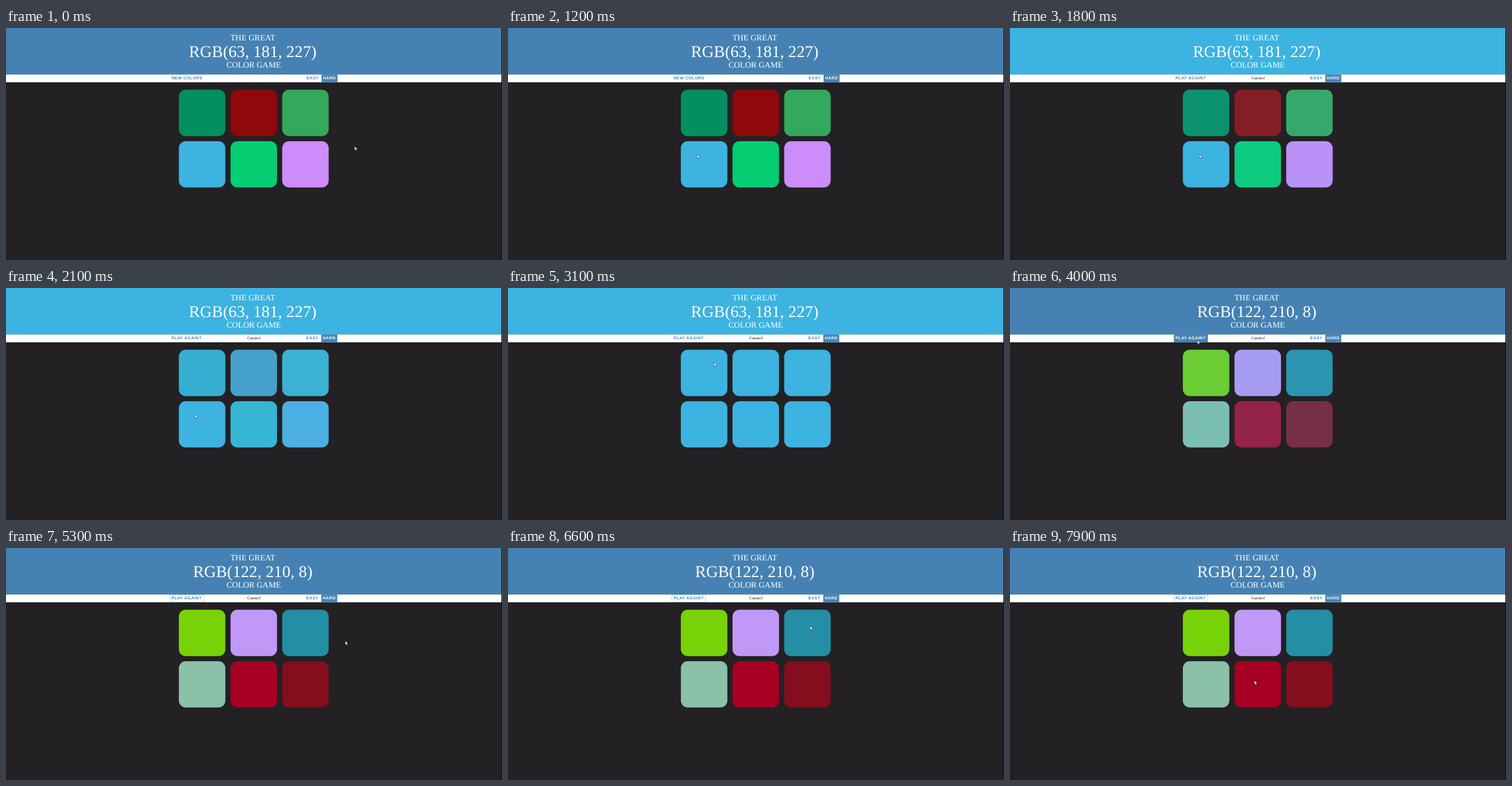
Animation of 800 by 375 pixels, one loop 8000 ms. Source, as an HTML page with a canvas:

```html
<!DOCTYPE html>
<html lang="en">
<head>
<meta charset="utf-8">
<title>Color Game</title>
<style>
  html, body { margin: 0; width: 100%; height: 100%; overflow: hidden; background: #232123; }
  canvas { display: block; }
</style>
</head>
<body>
<canvas id="stage" width="800" height="375"></canvas>
<script>
const ctx = document.getElementById('stage').getContext('2d');
ctx.textRendering = 'geometricPrecision';

const LOOP = 8000, STEP = 100;
const WIN = 1730, RESET = 3700, FADE = 600;
const HOVER_IN = 3350, HOVER_OUT = 4600, HOVER_FADE = 300;

const STEEL = '#4582b3', SKY = '#3cb3e0', DARK = '#232123', WHITE = '#ffffff';
const ROUND_ONE = ['#048f5f', '#8e080c', '#34a85c', SKY, '#05ce73', '#cc8cfa'];
const ROUND_TWO = ['#78d208', '#c098f7', '#248ea4', '#8ac1a8', '#a80022', '#840e1e'];

const SERIF = '"Liberation Serif", "Times New Roman", serif';
const SANS = '"Liberation Sans", Arial, sans-serif';

// The page is laid out at 1920 wide and shown at 800.
const ZOOM = 800 / 1920;
const H1 = 32 * ZOOM, BODY = 16 * ZOOM;
const BAR_TOP = 75.2, BAR_H = 30 * ZOOM;
const TILE = 180 * ZOOM, GAP = 20 * ZOOM;

const ARROW = new Path2D('M.5 .5V16L4 12.8L6.6 18.5L9 17.5L6.5 11.8L11.5 11.5Z');

const HOME = { x: 562, y: 191 };
const MOVES = [
  { from: 100, to: 1000, x: 305, y: 204 },
  { from: 2400, to: 3500, x: 302, y: 84, bowX: 32 },
  { from: 4400, to: 5200, x: 547, y: 150 },
  { from: 5700, to: 7800, x: 394, y: 214, bowY: -50 }
];

const clamp = v => Math.max(0, Math.min(1, v));

function mix(a, b, k) {
  const part = (hex, i) => parseInt(hex.slice(i, i + 2), 16);
  const parts = [1, 3, 5].map(i => Math.round(part(a, i) + (part(b, i) - part(a, i)) * k));
  return `rgb(${parts})`;
}

// CSS "ease": cubic-bezier(.25, .1, .25, 1)
function ease(x) {
  x = clamp(x);
  const bez = (a, b, u) => 3 * a * u * (1 - u) ** 2 + 3 * b * u * u * (1 - u) + u ** 3;
  let lo = 0, hi = 1;
  for (let i = 0; i < 24; i++) {
    const mid = (lo + hi) / 2;
    if (bez(0.25, 0.25, mid) < x) lo = mid; else hi = mid;
  }
  return bez(0.1, 1, lo);
}

// Each move glides on from the last place, with an optional bow to one side.
function cursorAt(t) {
  let { x, y } = HOME;
  for (const { from, to, x: toX, y: toY, bowX = 0, bowY = 0 } of MOVES) {
    const u = clamp((t - from) / (to - from));
    const k = u * u * (3 - 2 * u), bow = Math.sin(Math.PI * u);
    x += (toX - x) * k + bowX * bow;
    y += (toY - y) * k + bowY * bow;
  }
  return [x, y];
}

function rect(x, y, w, h, fill) {
  ctx.fillStyle = fill;
  ctx.fillRect(x, y, w, h);
}

function text(str, x, y, font, fill, align = 'left', spacing = 0) {
  ctx.font = font;
  ctx.fillStyle = fill;
  ctx.textAlign = align;
  ctx.letterSpacing = spacing + 'px';
  ctx.fillText(str, x, y);
}

const label = (str, x, fill) => text(str, x, 83.4, `bold ${BODY}px ${SANS}`, fill, 'left', ZOOM);

function drawHeader(t) {
  const won = t >= WIN && t < RESET;
  rect(0, 0, 800, BAR_TOP, won ? SKY : STEEL);
  const line = (str, x, y, size) => text(str, x, y, `${size}px ${SERIF}`, WHITE, 'center');
  line('THE GREAT', 398, 20.2, H1);
  line(t < RESET ? 'RGB(63, 181, 227)' : 'RGB(122, 210, 8)', 398, 46.6, 2 * H1);
  line('COLOR GAME', 399.6, 64.1, H1);
}

function drawBar(t) {
  const played = t >= WIN, shift = played ? -0.5 : 0;
  const hover = ease((t - HOVER_IN) / HOVER_FADE) - ease((t - HOVER_OUT) / HOVER_FADE);
  const box = (x, w, fill) => rect(x, BAR_TOP, w, BAR_H, fill);

  box(0, 800, WHITE);
  if (hover > 0) box(264.5, 54.5, mix(WHITE, STEEL, hover));
  if (t >= RESET) {
    ctx.strokeStyle = 'rgba(70,130,180,.6)';
    ctx.lineWidth = 0.6;
    ctx.strokeRect(264.7, BAR_TOP + 0.3, 54.2, BAR_H - 0.6);
  }
  label(played ? 'PLAY AGAIN?' : 'NEW COLORS', 266.9, mix(STEEL, WHITE, hover));
  if (played) text('Correct!', 389.2, 83.2, `${BODY}px ${SERIF}`, '#000');
  label('EASY', 484.8 + shift, STEEL);
  box(509 + shift, 25.8, STEEL);
  label('HARD', 511.4 + shift, WHITE);
}

function drawTiles(t) {
  const second = t >= RESET;
  const k = ease((t - (second ? RESET : WIN)) / FADE);
  for (let i = 0; i < 6; i++) {
    const x = 278.8 + (i % 3) * (TILE + GAP);
    const y = 99.8 + Math.floor(i / 3) * (TILE + GAP - 0.2);
    ctx.fillStyle = second ? mix(SKY, ROUND_TWO[i], k) : mix(ROUND_ONE[i], SKY, k);
    ctx.beginPath();
    ctx.roundRect(x, y, TILE, TILE - 0.1, TILE * 0.15);
    ctx.fill();
  }
}

function drawCursor(t) {
  const [x, y] = cursorAt(t);
  ctx.save();
  ctx.translate(Math.round(x), Math.round(y));
  ctx.scale(ZOOM, ZOOM);
  ctx.fillStyle = WHITE;
  ctx.strokeStyle = '#000';
  ctx.lineWidth = 1;
  ctx.fill(ARROW);
  ctx.stroke(ARROW);
  ctx.restore();
}

function draw(t) {
  rect(0, 0, 800, 375, DARK);
  drawHeader(t);
  drawBar(t);
  rect(799, 0, 1, 375, '#111');
  drawTiles(t);
  drawCursor(t);
}

const start = performance.now();
function tick() {
  const t = (performance.now() - start) % LOOP;
  draw(Math.floor(t / STEP) * STEP);
  requestAnimationFrame(tick);
}
tick();
</script>
</body>
</html>
```
